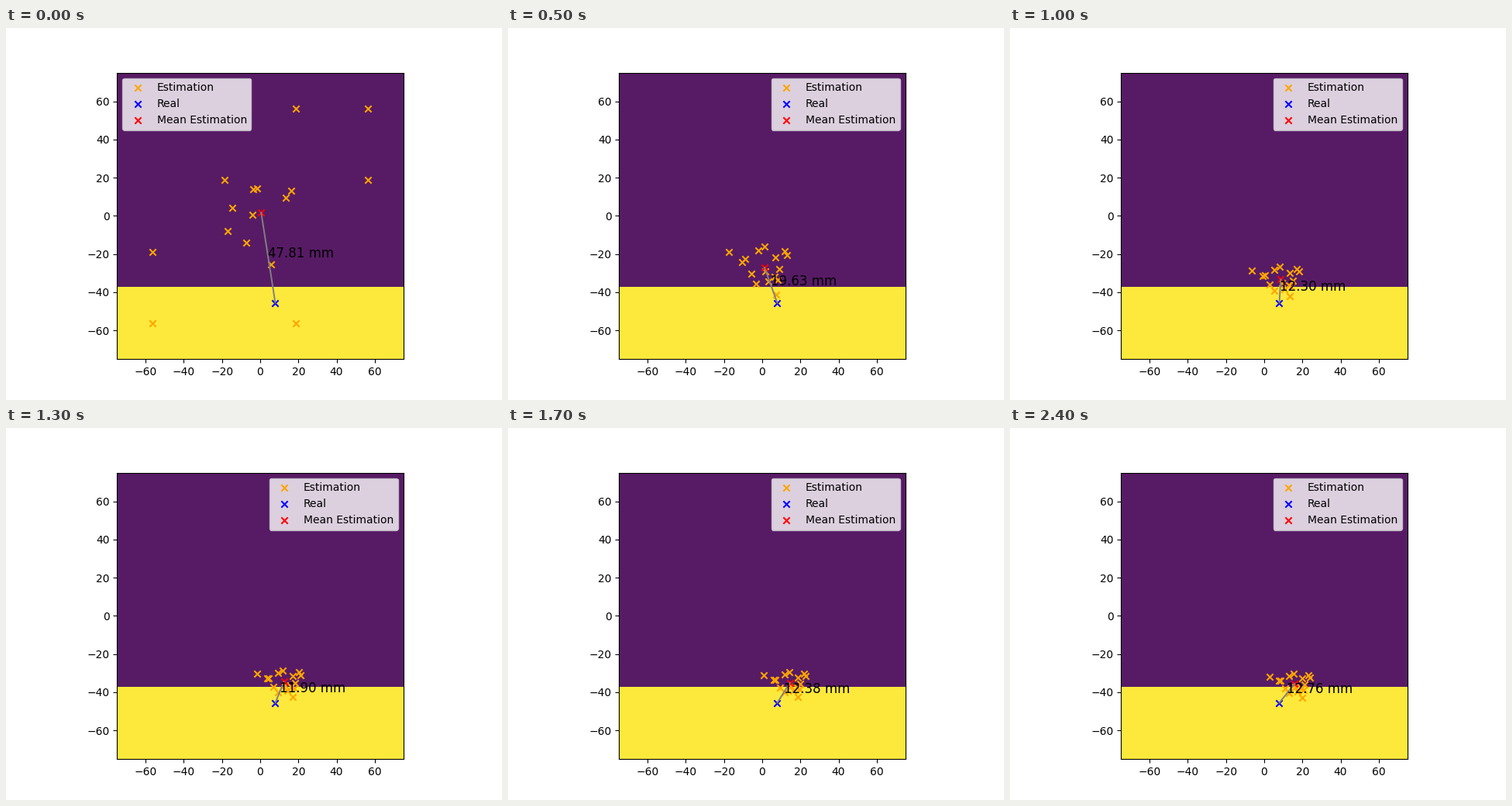
Animation, 640 px wide and 480 px high, one loop 2.5 s. Source, as a matplotlib script:

```python
import numpy as np
import matplotlib.pyplot as plt
from matplotlib.animation import FuncAnimation

FRAMES, STEP = 25, 100
HALF = 75                       # half the side of the area, in mm
CELL = HALF / 4                 # half the side of one of the 4 x 4 cells
REAL = np.array([7.9, -45.54])

# Course of the mean: time in ms, distance to the real spot, x position
TIMES = [0, 200, 500, 1000, 1300, 1700, 2400]
ERRORS = [47.81, 39.16, 19.63, 12.30, 11.90, 12.38, 12.76]
MEAN_X = [0.5, 3.6, 1.2, 8.7, 12.4, 14.5, 15.9]

# First guesses: free ones near the middle, the rest on cell centres
free = np.array([(-3.7, 14), (-1.6, 14.4), (16.2, 13.1), (13.4, 9.5),
                 (-14.6, 4.2), (-4.1, 0.6), (-17, -8), (-7.3, -14),
                 (5.7, -25.4)])
cells = CELL * np.array([(3, 1), (-1, 1), (-3, -1), (-3, -3),
                         (1, -3), (1, 3), (3, 3)])
start = np.vstack([free, cells])
LATE = len(free)                # this guess leaves its cell last

# Settled swarm, relative to its mean
swarm = np.array([(-7.3, 1.6), (-4.9, -2.4), (-2.8, 4.1), (-0.4, 5.3),
                  (-13, 3.7), (0.4, -1.6), (-2.8, -4.9), (1.6, -4.1),
                  (4.1, 2.8), (5.3, -0.4), (-8.1, 1.6), (4.1, -7.3),
                  (4.9, -3.3), (3.7, -2.4), (7.3, 4.5), (8.1, 3.3)])


def course(t):
    """Distance to the real spot and position of the mean."""
    error = np.interp(t, TIMES, ERRORS)
    x = np.interp(t, TIMES, MEAN_X)
    y = REAL[1] + np.sqrt(error**2 - (x - REAL[0])**2)
    return error, np.array([x, y])


def estimates(t, mean):
    """Free guesses glide into the shrinking swarm, the others jump."""
    if t == 0:
        return start
    spread = 1 + np.array([1.2 * np.exp(-t / 500), 3.9 * np.exp(-t / 350)])
    points = mean + swarm * spread
    points[:LATE] += (free - points[:LATE]) * np.exp(-t / 150)
    if t < 300:
        points[LATE] = start[LATE]
    return points


fig, ax = plt.subplots(figsize=(6.4, 4.8), dpi=100)

# The lowest row of cells is the marked zone
zones = np.zeros((4, 4))
zones[-1] = 1
ax.imshow(zones, extent=[-HALF, HALF, -HALF, HALF], alpha=0.9,
          cmap="viridis", interpolation="nearest")
ax.set_xticks(range(-60, 61, 20))
ax.set_yticks(range(-60, 61, 20))

dots = ax.scatter([], [], marker="x", color="orange", label="Estimation")
ax.scatter(*REAL, marker="x", color="blue", label="Real")
center = ax.scatter([], [], marker="x", color="red", label="Mean Estimation")
link, = ax.plot([], [], color="gray", lw=1.4, zorder=1)
label = ax.text(0, 0, "", fontsize=12)
legend = ax.legend(loc="upper left")
ax.set_xlim(-HALF, HALF)
ax.set_ylim(-HALF, HALF)


def draw(frame):
    t = frame * STEP
    error, mean = course(t)
    dots.set_offsets(estimates(t, mean))
    center.set_offsets([mean])
    link.set_data(*zip(mean, REAL))
    label.set_position((mean + REAL) / 2)
    label.set_text(f"{error:.2f} mm")
    legend.set_loc("upper left" if frame == 0 else "upper right")
    return dots, center, link, label, legend


anim = FuncAnimation(fig, draw, frames=FRAMES, interval=STEP, repeat=True)
plt.show()
```
